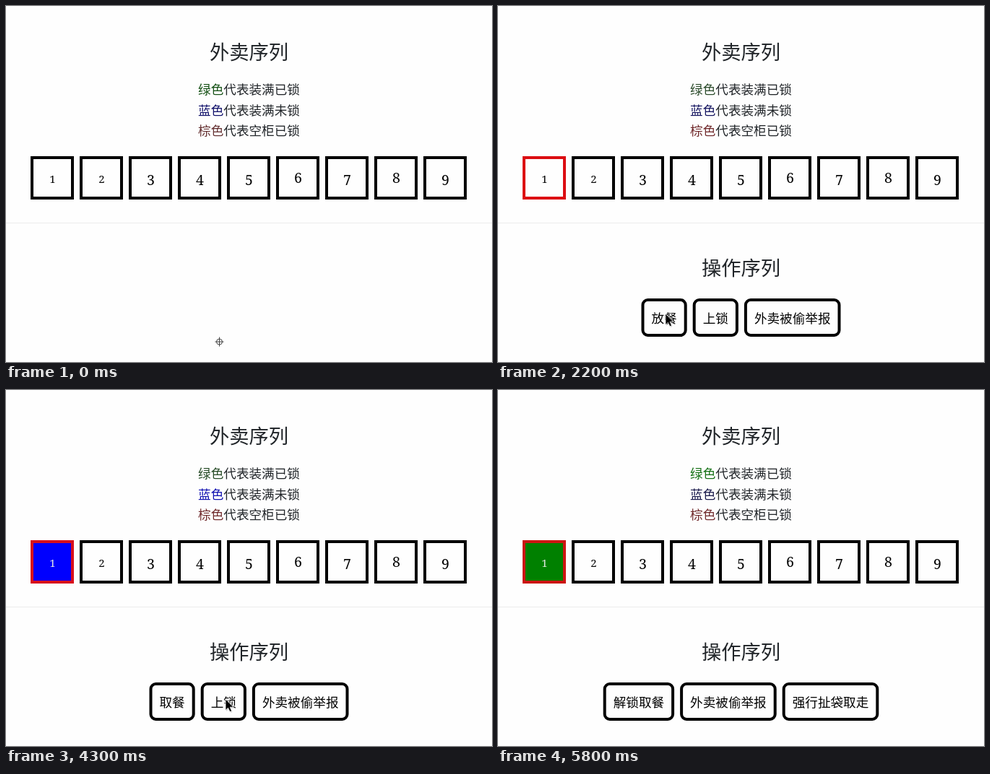
An HTML page for the animation above (6.7 s loop, 673 by 493 pixels).

```html
<!DOCTYPE html>
<html lang="zh-CN">
<head>
<meta charset="utf-8">
<title>外卖序列</title>
<style>
html, body { margin: 0; width: 100%; height: 100%; overflow: hidden; background: #fefefe; }
svg { display: block; }
text { font: 17.6px "Noto Sans CJK SC", "Noto Sans CJK", sans-serif; text-anchor: middle; fill: #212529; }
.title { font-size: 27.3px; }
.button { fill: #000; }
.digit { font-family: "Noto Serif", serif; }
.frame { fill: none; stroke: #000; stroke-width: 4; }
</style>
</head>
<body>
<svg width="673" height="493" viewBox="0 0 673 493">
  <g id="scene"></g>
  <g id="cross" fill="none" stroke="#444" stroke-width="1">
    <circle r="4"/><path d="M-6 0H6M0 -6.5V6.5"/>
  </g>
  <g id="arrow">
    <path d="M1 2V17L4.500 13.700 7 19 9.500 18 7.300 12.800H12.500Z" fill="#000" opacity=".15"/>
    <path d="M0 0V15.500L3.500 12.200 6 17.600 8.600 16.500 6.200 11.200H11Z" stroke="#fff" stroke-width=".8"/>
  </g>
</svg>
<script>
const LOOP = 6700, STEP = 100, MID = 336.5;
const $ = id => document.getElementById(id);

const states = [
  { at: 0, green: '#145014', blue: '#10106a', brown: '#643031' },
  { at: 1200, border: '#dc0d12', green: '#2a4a2a', blue: '#14145f', brown: '#70292b',
    buttons: ['放餐', '上锁', '外卖被偷举报'] },
  { at: 3200, border: '#d80f1c', fill: '#0000fe', green: '#254a25', blue: '#1010b0', brown: '#70292b',
    buttons: ['取餐', '上锁', '外卖被偷举报'] },
  { at: 4900, border: '#cc1512', fill: '#008000', green: '#147014', blue: '#18184a', brown: '#70292b',
    buttons: ['解锁取餐', '外卖被偷举报', '强行扯袋取走'] }
];

// Pointer path: time, x, y
const path = [
  [100, 282, 450], [700, 66, 233], [1300, 66, 233], [1700, 275, 407], [2100, 232, 426],
  [2800, 231, 428], [3400, 231, 428], [4200, 304, 428], [5000, 304, 428], [5300, 332, 430], [5700, 372, 505]
];

const label = (x, y, str, attrs = '') => `<text x="${x}" y="${y}" ${attrs}>${str}</text>`;
const box = (x, y, w, h, attrs = '') =>
  `<rect class="frame" x="${x + 2}" y="${y + 2}" width="${w - 4}" height="${h - 4}" ${attrs}/>`;

function locker(n, s) {
  const x = 34 + 68 * (n - 1), first = n === 1;
  const style = first ? `style="fill:${s.fill || 'none'};stroke:${s.border || '#000'}"` : '';
  // Old-style numerals: 1 and 2 are short, odd ones and 4 hang below the line
  const size = n < 3 ? 15 : 19.5, drop = n > 2 && n !== 6 && n !== 8 ? 3.5 : 0;
  const color = first && s.fill ? '#e4e8e4' : '#000';
  return box(x, 208, 60, 60, style) +
    label(x + 30.5, 244.5 + drop, n, `class="digit" style="font-size:${size}px;fill:${color}"`);
}

function buttonRow(names) {
  const width = name => name.length * 17.6 + 28;
  let x = MID - (names.reduce((sum, name) => sum + width(name), 0) + 8 * (names.length - 1)) / 2;
  return names.map(name => {
    const w = width(name), left = x;
    x += w + 8;
    return box(left, 405, w, 53, 'rx="7"') + label(left + w / 2, 439, name, 'class="button"');
  }).join('');
}

function draw(s) {
  const legend = [[s.green, '绿色', '代表装满已锁'], [s.blue, '蓝色', '代表装满未锁'], [s.brown, '棕色', '代表空柜已锁']];
  let out = label(MID, 74, '外卖序列', 'class="title"');
  legend.forEach(([color, name, rest], i) => {
    out += label(MID, 122.2 + 28.4 * i, `<tspan fill="${color}">${name}</tspan>${rest}`);
  });
  for (let n = 1; n <= 9; n++) out += locker(n, s);
  out += '<rect y="300" width="673" height="1" fill="#ebebeb"/>';
  if (s.buttons) out += label(MID, 373, '操作序列', 'class="title"') + buttonRow(s.buttons);
  $('scene').innerHTML = out;
}

function pointer(t) {
  const i = path.findIndex(p => p[0] > t);
  if (i < 0) return path[path.length - 1].slice(1);
  if (i === 0) return path[0].slice(1);
  const [t0, x0, y0] = path[i - 1], [t1, x1, y1] = path[i];
  const u = (t - t0) / (t1 - t0), k = u * u * (3 - 2 * u);
  return [x0 + (x1 - x0) * k, y0 + (y1 - y0) * k];
}

let shown;
function tick() {
  const t = Math.floor(performance.now() % LOOP / STEP) * STEP;
  const s = states.filter(state => state.at <= t).pop();
  if (s !== shown) draw(shown = s);
  $('cross').style.display = t < 100 ? '' : 'none';
  $('arrow').style.display = t < 100 ? 'none' : '';
  $('arrow').setAttribute('transform', `translate(${pointer(t)})`);
  requestAnimationFrame(tick);
}
$('cross').setAttribute('transform', 'translate(295.5 465)');
tick();
</script>
</body>
</html>
```
